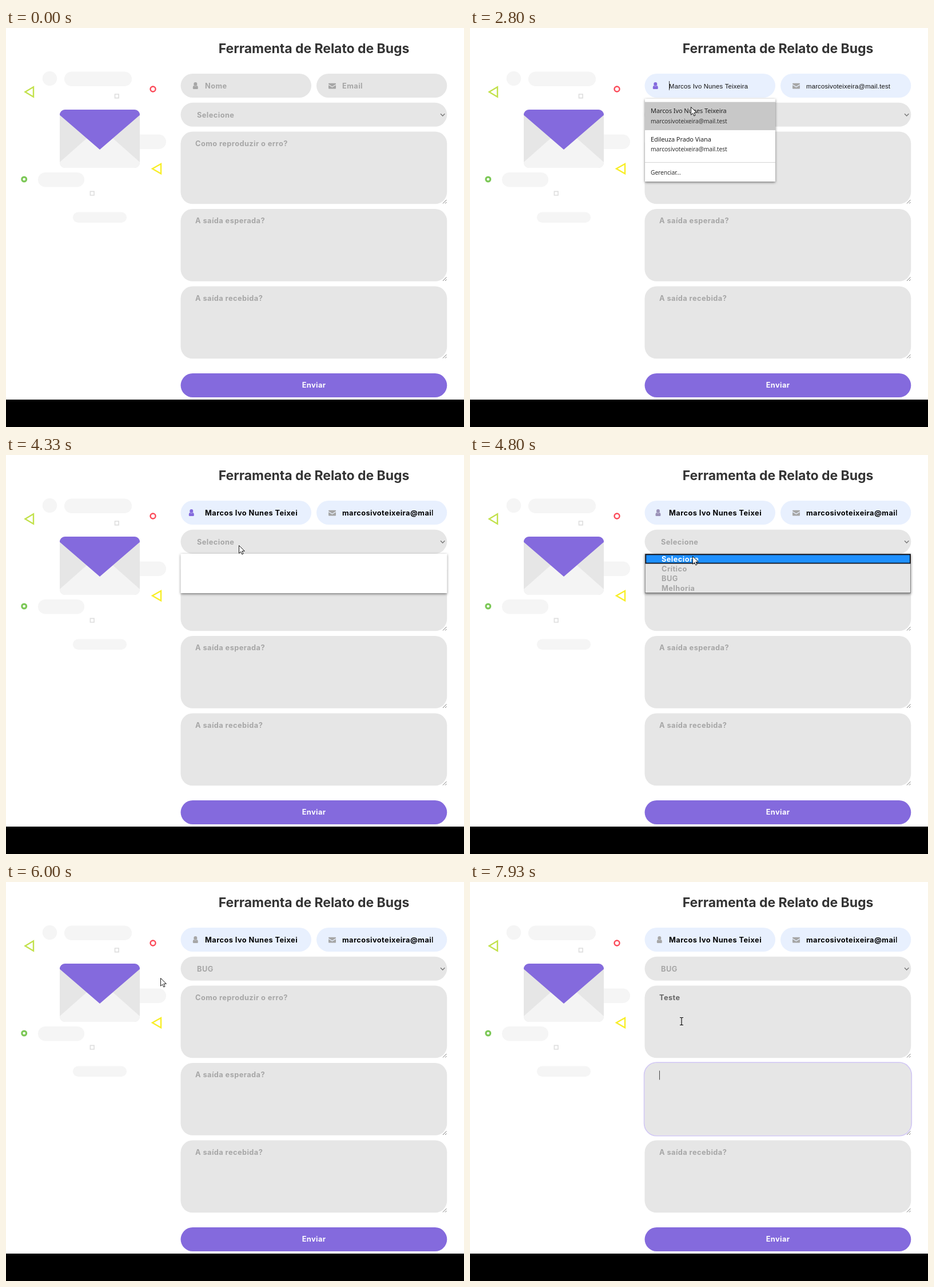
An HTML page for the animation above (8 s loop, 801 px wide and 699 px high).

```html
<!DOCTYPE html>
<html lang="pt">
<head>
<meta charset="utf-8">
<title>Ferramenta de Relato de Bugs</title>
<style>
html, body { margin: 0; width: 100%; height: 100%; overflow: hidden; background: #fff; }
svg { display: block; }
text { font: 700 12.75px Montserrat, Inter, sans-serif; letter-spacing: .45px; fill: #a6a6a6; }
.title { font-size: 23px; letter-spacing: -.05px; fill: #333; }
.value { fill: #000; }
.typed { fill: #666; }
.preview { font: 11.33px "Liberation Sans", Arial, sans-serif; letter-spacing: .2px; fill: #111; }
.name { font: 500 11px "Noto Sans", sans-serif; letter-spacing: -.1px; fill: #222; }
.small { font: 10.3px "Noto Sans", sans-serif; letter-spacing: -.1px; fill: #333; }
.white { fill: #fff; }
.field { fill: #e6e6e6; }
.cloud { fill: #f5f5f5; }
.line { fill: none; }
</style>
</head>
<body>
<svg width="801" height="699" viewBox="0 0 801 699">
  <defs>
    <clipPath id="nameClip"><rect x="347" y="84" width="162.5" height="34"/></clipPath>
    <clipPath id="mailClip"><rect x="587" y="84" width="159.5" height="34"/></clipPath>
    <clipPath id="envelope"><rect x="94" y="143" width="140" height="102" rx="9"/></clipPath>
    <filter id="shade" x="-5%" y="-10%" width="110%" height="125%">
      <feDropShadow dx="0" dy="1.5" stdDeviation="2" flood-opacity=".5"/>
    </filter>
    <path id="grip" d="M764 307.5l6.5-6.5M768 307.5l2.5-2.5" stroke="#777" stroke-width="1"/>
  </defs>

  <g class="cloud">
    <circle cx="76.5" cy="88.5" r="12.7"/>
    <rect x="102" y="76.5" width="118" height="25.5" rx="12.7"/>
    <rect x="200" y="186.5" width="80" height="25.5" rx="12.7"/>
    <rect x="56" y="253" width="81" height="25.5" rx="12.7"/>
    <rect x="117" y="322.5" width="94" height="18.5" rx="9.2"/>
  </g>
  <g class="line" stroke-width="2.4">
    <path d="M33.5 112L48 103.3V120.7Z" stroke="#c2e14b"/>
    <path d="M256 246.5L271 238V255.2Z" stroke="#f8ee27"/>
    <circle cx="257" cy="107" r="4.5" stroke="#fb4a59"/>
    <circle cx="31.7" cy="265" r="3.9" stroke="#7cc857" stroke-width="3.2"/>
    <path d="M190.5 116h6.6v6.6h-6.6zM147.4 286.4h6.6v6.6h-6.6z" stroke="#dedede" stroke-width="1.6"/>
  </g>
  <g clip-path="url(#envelope)">
    <rect x="94" y="143" width="140" height="102" fill="#e6e6e6"/>
    <path d="M94 235L164 173L234 235V245H94Z" fill="#f4f4f4"/>
    <path d="M94 143H234V152.5L164 213L94 152.5Z" fill="#846add"/>
  </g>

  <text class="title" x="538.5" y="44.3" text-anchor="middle">Ferramenta de Relato de Bugs</text>

  <rect id="glow" class="line" stroke="#846add"/>
  <path id="halo" class="line" stroke="#efefef" d="M318 82.5Q302.5 87 302.5 101T318 119.5M522 82.5Q537.5 87 537.5 101T522 119.5"/>

  <rect id="nameBox" class="field" x="305.5" y="80" width="228.5" height="42" rx="21"/>
  <rect id="mailBox" class="field" x="543" y="80" width="228.3" height="42" rx="21"/>
  <rect class="field" x="305.5" y="130.8" width="465.8" height="42" rx="21"/>
  <g class="field">
    <rect x="305.5" y="181.5" width="465.8" height="126.8" rx="21"/>
    <rect x="305.5" y="317" width="465.8" height="126.8" rx="21"/>
    <rect x="305.5" y="452.5" width="465.8" height="126.8" rx="21"/>
  </g>
  <use href="#grip"/><use href="#grip" y="135.5"/><use href="#grip" y="271"/>
  <rect x="305.5" y="605" width="465.8" height="42" rx="21" fill="#846add"/>
  <text class="white" x="538.6" y="630.4" text-anchor="middle">Enviar</text>
  <rect y="651" width="801" height="48"/>

  <path id="user" d="M-3 -3a3 3.2 0 1 1 6 0a3 3.4 0 1 1 -6 0M-2.8 -.6Q0 2.4 2.8 -.6Q4.6 .2 4.6 3.6Q4.6 5.8 2.8 5.8H-2.8Q-4.6 5.8 -4.6 3.6Q-4.6 .2 -2.8 -.6"/>
  <path d="M564 97.7Q564 96.7 565 96.7H576Q577 96.7 577 97.7V98.4L570.5 102.6L564 98.4ZM564 99.9L570.5 104L577 99.9V105.4Q577 106.4 576 106.4H565Q564 106.4 564 105.4Z" fill="#a6a6a6"/>

  <text id="nameHint" x="348" y="105.8">Nome</text>
  <text id="mailHint" x="588" y="105.8">Email</text>
  <g clip-path="url(#nameClip)"><text id="nameText" x="348" y="105.8">Marcos Ivo Nunes Teixeira</text></g>
  <g clip-path="url(#mailClip)"><text id="mailText" x="588" y="105.8">marcosivoteixeira@mail.test</text></g>
  <text id="choice" x="334" y="156.6"></text>
  <path class="line" d="M760 150.3l3.7 3.7l3.7-3.7" stroke="#777" stroke-width="1.4"/>
  <text id="area1" x="331" y="206.8"></text>
  <text id="area2" x="331" y="342.3">A saída esperada?</text>
  <text x="331" y="477.8">A saída recebida?</text>
  <rect id="caret" width="1" height="16" fill="#444"/>

  <g id="suggest">
    <rect x="306" y="124" width="228" height="145" fill="#fff" filter="url(#shade)"/>
    <rect id="suggestHover" x="306" y="129.6" width="228" height="49.4" fill="#c8c8c8"/>
    <text class="name" x="316" y="149.3">Marcos Ivo Nunes Teixeira</text>
    <text class="small" x="316" y="166.8">marcosivoteixeira@mail.test</text>
    <text class="name" x="316" y="198.6">Edileuza Prado Viana</text>
    <text class="small" x="316" y="216">marcosivoteixeira@mail.test</text>
    <rect x="306" y="235" width="228" height="1" fill="#d4d4d4"/>
    <text class="small" x="316" y="256.6">Gerenciar...</text>
  </g>

  <g id="menu">
    <rect x="305.7" y="173" width="465.4" height="69" fill="#fff" filter="url(#shade)"/>
    <g id="menuList">
      <rect x="306.2" y="173.5" width="464.4" height="68" fill="#e6e6e6" stroke="#777"/>
      <rect id="menuHover" x="307.3" width="462.6" height="15.2" fill="#1e90ff" stroke="#10131c" stroke-width="1.8"/>
    </g>
  </g>

  <path id="arrow" d="M.5 .5V14.2L3.7 11.3L5.8 16L8 15L5.9 10.3H10.3Z" fill="#fff" stroke="#000" stroke-width=".9"/>
  <path id="beam" class="line" d="M-3 -6.5H-1Q0 -6.5 0 -5.5V5.5Q0 6.5 -1 6.5H-3M3 -6.5H1Q0 -6.5 0 -5.5M0 5.5Q0 6.5 1 6.5H3" stroke="#000" stroke-width="1.1"/>
</svg>
<script>
const LOOP = 8000, RATE = 15;
const el = {};
document.querySelectorAll('svg [id]').forEach(n => el[n.id] = n);

const set = (id, attrs) => {
  for (const key in attrs) el[id].setAttribute(key, attrs[key]);
};
const show = (id, on) => set(id, { display: on ? 'inline' : 'none' });
const within = (k, from, to) => k >= from && k < to;
const ramp = (k, from, to) => Math.min(1, Math.max(0, (k - from) / (to - from)));
const ease = u => u * u * (3 - 2 * u);

const options = ['Selecione', 'Crítico', 'BUG', 'Melhoria'].map((label, i) => {
  const node = document.createElementNS('http://www.w3.org/2000/svg', 'text');
  node.textContent = label;
  node.setAttribute('x', 335);
  node.setAttribute('y', 186.6 + 17 * i);
  el.menuList.append(node);
  return node;
});

// Pointer path: tick, x, y
const path = [
  [16, 159, 201], [24, 397, 103], [35, 397, 103], [41, 386, 138],
  [49, 386, 138], [54, 400, 154], [58, 400, 154], [65, 407, 158],
  [67, 407, 158], [80, 353, 217], [85, 353, 217], [89, 262, 162], [95, 370, 244]
];

function pointer(k) {
  const i = path.findIndex(p => p[0] > k);
  if (i === 0) return path[0].slice(1);
  if (i < 0) return path[path.length - 1].slice(1);
  const [a, ax, ay] = path[i - 1], [b, bx, by] = path[i];
  const u = ease(ramp(k, a, b));
  return [ax + (bx - ax) * u, ay + (by - ay) * u];
}

function drawPointer(k, x, y) {
  const overName = k < 36 && x > 306 && x < 534 && y > 80 && y < 122;
  const overArea = k > 85 && x > 306 && y > 182;
  const beam = overName || overArea;
  show('arrow', k >= 13 && !beam);
  show('beam', beam);
  set(beam ? 'beam' : 'arrow', { transform: `translate(${Math.round(x)} ${Math.round(y)})` });
}

function drawContact(k) {
  const preview = within(k, 41, 44), filled = k >= 41;
  const fill = filled ? '#e8f0fe' : '#e6e6e6';
  set('nameBox', { style: `fill:${fill}` });
  set('mailBox', { style: `fill:${fill}` });
  show('nameHint', k < 24);
  show('mailHint', !filled);
  for (const id of ['nameText', 'mailText']) {
    show(id, filled);
    set(id, { class: preview ? 'preview' : 'value' });
  }
  const focus = ramp(k, 35, 41) - ramp(k, 68, 74);
  const mix = (a, b) => Math.round(a + (b - a) * focus);
  set('user', {
    transform: `translate(${331.3 - 7 * focus} 101.3)`,
    fill: `rgb(${mix(166, 132)},${mix(166, 106)},${mix(166, 221)})`
  });
  show('halo', within(k, 25, 35));
}

function drawMenus(k, y) {
  show('suggest', within(k, 35, 45));
  show('suggestHover', y >= 130);
  show('menu', within(k, 55, 82));
  show('menuList', k >= 66 && k < 82);
  const row = Math.max(0, Math.min(3, Math.floor((y - 174) / 17)));
  set('menuHover', { y: 174.4 + 17 * row });
  options.forEach((o, i) => o.setAttribute('class', i === row ? 'white' : ''));
  el.choice.textContent = k >= 82 ? 'BUG' : 'Selecione';
}

function drawAreas(k) {
  const typed = 'Teste'.slice(0, Math.max(0, Math.floor((k - 108) / 1.5) + 1));
  el.area1.textContent = k < 93 ? 'Como reproduzir o erro?' : typed;
  set('area1', { class: k < 93 ? '' : 'typed' });
  show('area2', k < 118);

  const second = k >= 118;
  show('caret', within(k, 24, 44) || within(k, 93, 97) || k >= 105);
  if (k < 44) set('caret', { x: 348, y: 93 });
  else if (second) set('caret', { x: 331, y: 330.5 });
  else set('caret', { x: 331 + (typed ? Math.round(el.area1.getComputedTextLength()) : 0), y: 195 });

  // Focus ring spreads outwards while it fades
  const u = second ? .08 * (k - 117) / 2 : ramp(k, 93, 97);
  const d = 9 * u;
  show('glow', second || within(k, 93, 97));
  set('glow', {
    x: 305.5 - d, y: (second ? 317 : 181.5) - d,
    width: 465.8 + 2 * d, height: 126.8 + 2 * d, rx: 21 + d,
    'stroke-width': 2 + 2 * u, 'stroke-opacity': .42 * (1 - u) ** 2
  });
}

function render(ms) {
  const k = Math.floor(ms % LOOP * RATE / 1000 + .06);
  const [x, y] = pointer(k);
  drawContact(k);
  drawMenus(k, y);
  drawAreas(k);
  drawPointer(k, x, y);
}

const start = performance.now();
(function loop() {
  render(performance.now() - start);
  requestAnimationFrame(loop);
})();
</script>
</body>
</html>
```
